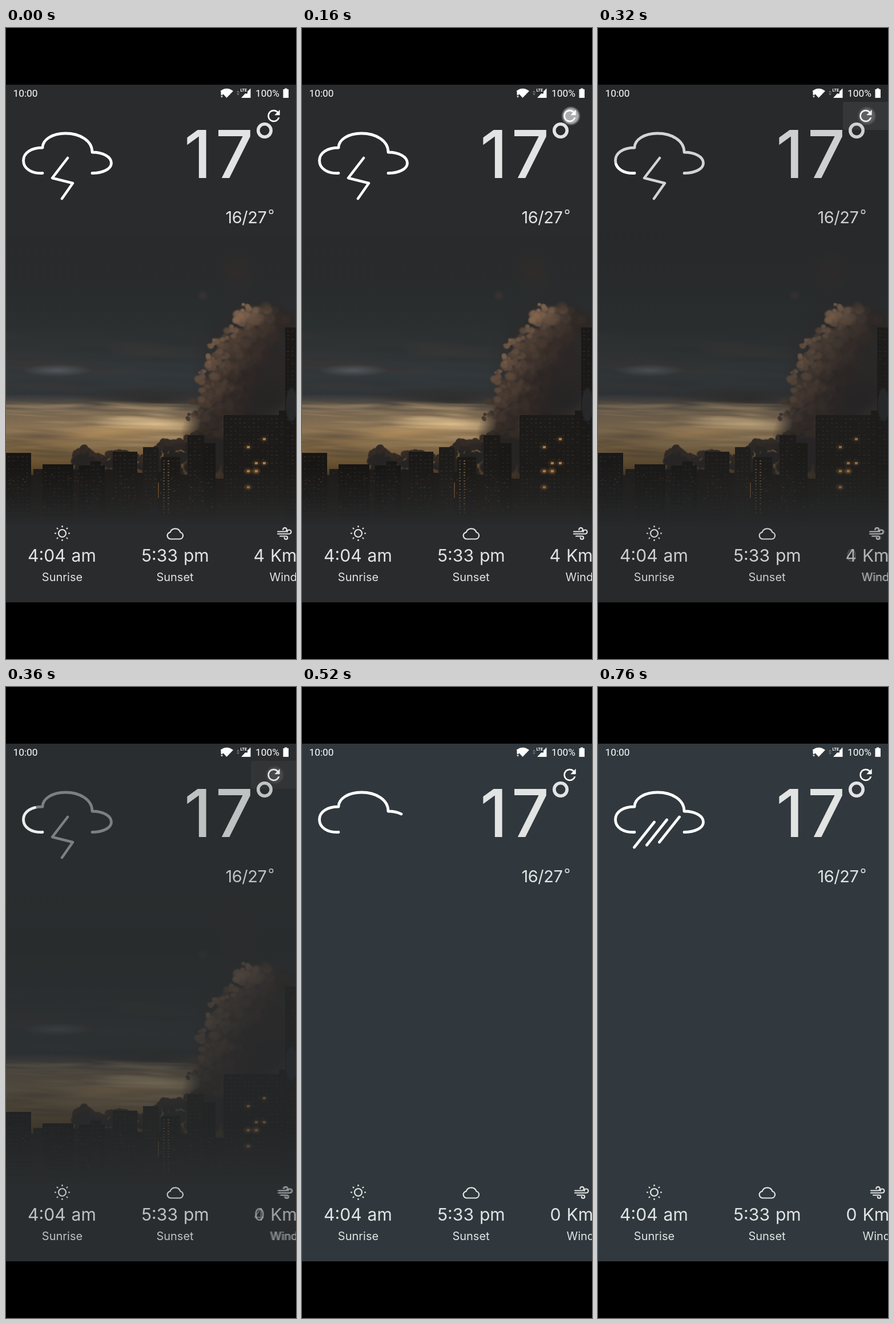
Recreate the animation shown at these times as an HTML page with a canvas. Size 508 by 1102 pixels, loop 1320 ms.

```html
<!DOCTYPE html>
<html lang="en">
<head>
<meta charset="utf-8">
<title>Weather refresh</title>
<style>
  html, body { margin: 0; width: 100%; height: 100%; overflow: hidden; background: #000; }
  #screen { position: absolute; left: 0; top: 99px; width: 508px; height: 904px; }
  canvas, svg { position: absolute; left: 0; top: 0; }
  .ui { font-family: Inter, "Open Sans", sans-serif; fill: #e2e4e4; }
  .status { font: 17.3px Roboto, sans-serif; fill: #fff; }
  .line { fill: none; stroke: #e2e4e4; stroke-width: 2.2; }
  .weather { fill: none; stroke: #fff; stroke-width: 4.8; stroke-linecap: round; stroke-linejoin: round; }
  .value { font-size: 30.1px; word-spacing: 1.5px; }
  .label { font-size: 20px; }
  .mid { text-anchor: middle; }
</style>
</head>
<body>
<div id="screen"></div>
<canvas id="photo" width="508" height="1102"></canvas>
<svg width="508" height="1102" viewBox="0 0 508 1102">
  <defs>
    <radialGradient id="glow">
      <stop offset=".72" stop-color="#e8ebf0" stop-opacity=".68"/>
      <stop offset=".86" stop-color="#dfe4ea" stop-opacity=".35"/>
      <stop offset="1" stop-color="#fff" stop-opacity="0"/>
    </radialGradient>
    <path id="cloud" d="M64 253.5C44 254.5 30.5 245 30.5 231.5C30.5 218 44 209 64 209C64 195 81 184 104 184C130 184 151 197 151 217C170 217 184.500 225 184.500 236C184.500 246 170 253.500 151 253.500"/>
    <path id="wind" class="line" stroke-linecap="round" d="M476 879.5H488.5a3.3 3.3 0 1 0-3.3-3.3M476 883.5H496a3.5 3.5 0 1 0-3.5-3.5M480 887.5H490.5a2.7 2.7 0 1 1-2.7 2.7"/>
  </defs>

  <g class="status">
    <text x="12.5" y="119.7">10:00</text>
    <text x="437" y="119.7">100%</text>
    <text x="410.5" y="111" font-size="7" font-weight="700">LTE</text>
    <path d="M375.5 110Q386.5 101.5 398 110L386.5 122L381 116H376.5V111Z"/>
    <path d="M376 117.5h4l-2-2zM376 119h4l-2 2.5z"/>
    <path d="M428.5 105.5V122H412L419 114.5H423V110.7Z"/>
    <path d="M404 112.5h5l-2.5-3zM404 114.5h5l-2.5 3z" fill="#777a7b"/>
    <path d="M488 105.5h4.5v1.5h2.5v15h-9.5v-15h2.5z"/>
  </g>

  <rect id="press" x="429" y="129" width="83" height="49" rx="4" fill="#fff" fill-opacity=".1"/>
  <g class="ui" id="ui">
    <text x="440" y="262" font-size="115.5" font-weight="500" letter-spacing="7" text-anchor="end">17</text>
    <circle cx="453" cy="179" r="11.2" class="line" style="stroke-width:5.6"/>
    <text x="384.5" y="341" font-size="29" letter-spacing="-.5">16/27</text>
    <circle cx="464.5" cy="321" r="3.2" class="line" style="stroke-width:1.5"/>

    <g class="line" id="sun"><circle cx="98.5" cy="882.5" r="6.5"/></g>
    <path class="line" d="M289 892.5H304.5A6 6 0 0 0 305.5 880.7A9.5 9.5 0 0 0 287.6 880.6A6 6 0 0 0 289 892.5Z"/>
    <g class="mid">
      <text class="value" x="98" y="932">4:04 am</text>
      <text class="value" x="296.5" y="932">5:33 pm</text>
      <text class="label" x="98.5" y="966">Sunrise</text>
      <text class="label" x="296" y="966">Sunset</text>
    </g>
    <g id="windOld">
      <use href="#wind"/>
      <text class="value" x="433.5" y="932">4 Km/h</text>
      <text class="label" x="461.5" y="966">Wind</text>
    </g>
    <g id="windNew">
      <use href="#wind" x="2"/>
      <text class="value" x="434.5" y="932">0 Km/h</text>
      <text class="label" x="463.5" y="966">Wind</text>
    </g>
  </g>
  <circle id="tap" cx="471" cy="153.5" r="17" fill="url(#glow)"/>
  <path id="refresh" fill="#fff" transform="translate(453 137.5) scale(1.333)" d="M17.65 6.35C16.2 4.9 14.21 4 12 4c-4.42 0-7.99 3.58-7.99 8s3.57 8 7.99 8c3.73 0 6.84-2.55 7.73-6h-2.08c-.82 2.33-3.04 4-5.65 4-3.31 0-6-2.69-6-6s2.69-6 6-6c1.66 0 3.14.69 4.22 1.78L13 11h7V4z"/>

  <g class="weather" id="storm">
    <use href="#cloud"/>
    <path d="M108 227L81 262L117 271L98 298" stroke-width="4.5"/>
  </g>
  <g class="weather" id="rain">
    <use href="#cloud"/>
    <path d="M98.5 236l-35 44"/>
    <path d="M120.5 232l-35 44"/>
    <path d="M142.5 227l-35 44"/>
  </g>
  <path d="M0 0H508V99H0ZM0 1003H508V1102H0Z"/>
</svg>

<script>
const $ = id => document.getElementById(id);
const LOOP = 1320, STEP = 40;
const mix = (a, b, p) => a + (b - a) * p;
const blend = (a, b, p) => a.map((v, i) => mix(v, b[i], p));
const rgba = (c, alpha = 1) => `rgba(${c.map(Math.round)},${alpha})`;
const ramp = (t, from, to) => Math.max(0, Math.min(1, (t - from) / (to - from)));
const smooth = (t, from, to) => { const p = ramp(t, from, to); return p * p * (3 - 2 * p); };

// ---- dusk skyline, painted once ----
const g = $('photo').getContext('2d');
let seed = 11;
const rnd = (a = 0, b = 1) => mix(a, b, (seed = seed * 16807 % 2147483647) / 2147483647);

const BG = [42, 43, 44], DARK = [38, 35, 35], LIT = [136, 106, 82], GOLD = [226, 194, 144];

// Ellipse with a soft rim; `core` is the solid share of its radius
function blob(x, y, rx, ry, color, alpha = 1, core = 0, tilt = 0) {
  g.save();
  g.translate(x, y);
  g.rotate(tilt);
  g.scale(rx, ry);
  const grad = g.createRadialGradient(0, 0, core, 0, 0, 1);
  grad.addColorStop(0, rgba(color, alpha));
  grad.addColorStop(1, rgba(color, 0));
  g.fillStyle = grad;
  g.fillRect(-1, -1, 2, 2);
  g.restore();
}
function fillBand(y0, y1, colors) {
  const grad = g.createLinearGradient(0, y0, 0, y1);
  colors.forEach((c, i) => grad.addColorStop(i / (colors.length - 1), c));
  g.fillStyle = grad;
  g.fillRect(0, y0, 508, y1 - y0);
}
// Point at share s of a polyline
function along(points, s) {
  const k = s * (points.length - 1), i = Math.min(points.length - 2, Math.floor(k));
  return blend(points[i], points[i + 1], k - i);
}

function paintSky() {
  fillBand(360, 520, [rgba(BG, 0), '#292b2c', '#2a2f30']);
  fillBand(520, 640, ['#2a2f30', '#303334', '#32383b', '#303538']);
  fillBand(640, 800, ['#33363a', '#75644f', '#8d7453', '#806640', '#5f4a2b', '#2a241d']);
  for (let i = 0; i < 40; i++)
    blob(rnd(0, 320), rnd(535, 650), rnd(50, 130), rnd(5, 12), rnd() < .5 ? [62, 55, 52] : [41, 46, 49], .3, 0, .05);
  blob(90, 598, 62, 11, [104, 115, 122], .55);
  blob(260, 648, 140, 26, [45, 44, 43], .9);

  // Light gathers on a line that sinks and brightens towards the right
  for (let i = 0; i < 90; i++) {
    const x = rnd(-20, 300), y = rnd(656, 750);
    const light = 1 - Math.abs(y - 662 - x * .1) / 60;
    const tone = blend([84, 70, 54], GOLD, ramp(light * .6 + x / 700 + rnd(-.3, .2), 0, 1));
    blob(x, y, rnd(35, 95), rnd(2, 6), tone, .38, 0, rnd(-.03, .1));
  }
  blob(262, 692, 110, 15, GOLD, .85, 0, .03);
  blob(175, 706, 110, 13, [190, 150, 94], .65, 0, -.04);
  blob(60, 713, 90, 9, [91, 76, 60], .7);
}

function paintClouds() {
  blob(405, 425, 40, 45, [56, 46, 42], .45);
  blob(345, 467, 11, 10, [72, 61, 55], .5);
  blob(445, 600, 125, 150, [43, 39, 39], 1, .35);
  blob(400, 715, 95, 80, DARK, 1, .6);
  const edge = [[412, 486], [385, 518], [354, 550], [346, 585], [330, 612], [334, 640], [310, 666], [320, 698]];

  // Billows from the shaded depth out to the sunlit rim
  const count = 520;
  for (let i = 0; i < count; i++) {
    const depth = 1 - i / count, s = rnd();
    const [x, y] = along(edge, s);
    const light = (1 - depth) ** 1.5 * (1 - .85 * s) + rnd(-.14, .14);
    const r = rnd(3, 7) + 9 * depth;
    blob(x + 4 + depth * 95 + rnd(-3, 4), y + rnd(-9, 9) + depth * 12, r * 1.15, r,
         blend([44, 37, 35], LIT, ramp(light, 0, 1)), mix(.9, .25, depth), .5);
  }
  blob(428, 502, 34, 20, [118, 92, 74], .6);
  blob(465, 655, 70, 60, [36, 34, 35], .8);

  // Low cumulus behind the roofs
  const low = [[122, 745], [136, 732], [160, 748], [198, 740], [238, 750], [272, 720], [302, 724], [346, 700], [390, 715]];
  for (let i = 0; i < 420; i++) {
    const [x, y] = along(low, rnd()), drop = rnd() ** 2 * 65, r = rnd(3, 8) + drop / 12;
    blob(x + rnd(-3, 3), y + drop, r, r, blend([54, 44, 37], DARK, ramp(drop, 0, 14)), 1, .65);
  }
}

function paintCity() {
  const box = (x, y, w, h, color, alpha) => { g.fillStyle = rgba(color, alpha); g.fillRect(x, y, w, h); };
  const towers = [[0, 742, 44], [64, 762, 54], [128, 764, 45], [148, 757, 18], [187, 740, 43], [240, 732, 27],
                  [272, 749, 33], [318, 711, 29], [347, 725, 20], [381, 676, 98], [478, 668, 30], [489, 523, 19]];
  for (let x = 0; x < 508; x += 16) box(x, rnd(770, 790), 17, 100, [29, 26, 24]);
  for (const [x, y, w] of towers) {
    box(x, y, w, 870 - y, blend([22, 21, 20], [30, 28, 26], rnd()));
    for (let fy = y + 6; fy < 850; fy += 7)
      for (let fx = x + 3; fx < x + w - 4; fx += 8)
        box(fx, fy, 4, 2, [74, 60, 47], rnd(0, .4));
  }
  for (let i = 0; i < 150; i++) box(rnd(0, 378), rnd(775, 848), rnd(1, 3), 1.5, [150, 100, 58], rnd(.1, .5));
  for (let y = 755; y < 848; y += 5) {
    box(275, y, 3, 2, [170, 126, 72], rnd(.2, .6));
    box(283, y, 3, 2, [170, 126, 72], rnd(.2, .7));
  }
  box(266, 794, 2, 27, [164, 105, 53], .6);
  for (let i = 0; i < 11; i++) {
    const x = 422 + 14 * Math.floor(rnd(0, 3)), y = 702 + 14 * Math.floor(rnd(0, 8));
    blob(x + 2, y + 2, 9, 7, [156, 101, 46], .35);
    box(x, y, 5, 4, [180, 134, 78], .9);
  }
  blob(500, 658, 11, 32, [38, 40, 42], 1, .8);
}

paintSky();
paintClouds();
paintCity();
g.globalCompositeOperation = 'destination-out';
fillBand(765, 870, ['rgba(0,0,0,0)', 'rgba(0,0,0,.4)', '#000']);
g.fillRect(0, 870, 508, 232);

// ---- sun rays ----
let rays = '';
for (let i = 0; i < 8; i++) {
  const c = Math.cos(i * Math.PI / 4), s = Math.sin(i * Math.PI / 4);
  rays += `M${98.5 + 10.5 * c} ${882.5 + 10.5 * s}L${98.5 + 13.5 * c} ${882.5 + 13.5 * s}`;
}
$('sun').insertAdjacentHTML('beforeend', `<path d="${rays}"/>`);

// ---- motion ----
const strokes = [...$('rain').children].map(el => {
  const path = el.tagName === 'use' ? $('cloud') : el;
  return { el, length: path.getTotalLength() };
});
const total = strokes.reduce((sum, s) => sum + s.length, 0);

// One pen runs through all strokes in turn
function drawStrokes(pen) {
  for (const { el, length } of strokes) {
    const shown = Math.max(0, Math.min(pen, length));
    el.style.visibility = shown ? 'visible' : 'hidden';
    el.style.strokeDasharray = shown < length ? `${shown} 999` : 'none';
    pen -= length;
  }
}

function pose(t) {
  const change = smooth(t, 280, 420);
  const dip = Math.sin(Math.PI * ramp(t, 280, 520));
  const shade = 1 - .1 * Math.sin(Math.PI * ramp(t, 280, 380));
  const opacity = {
    photo: 1 - change, storm: 1 - change, windOld: 1 - change, windNew: change,
    ui: 1 - .21 * dip, rain: 1 - .17 * dip, refresh: 1 - .17 * dip,
    tap: ramp(t, 0, 120) * (1 - ramp(t, 160, 400)),
    press: ramp(t, 160, 280) * (1 - ramp(t, 280, 400))
  };
  for (const id in opacity) $(id).style.opacity = opacity[id];
  const color = blend(BG, [49, 57, 62], ramp(t, 280, 540));
  $('screen').style.background = rgba(color.map(v => v * shade));
  drawStrokes(total * ramp(t, 280, 760));
}

const start = performance.now();
function frame(now) {
  pose(Math.floor(Math.max(0, now - start) % LOOP / STEP) * STEP);
  requestAnimationFrame(frame);
}
frame(start);
</script>
</body>
</html>
```
